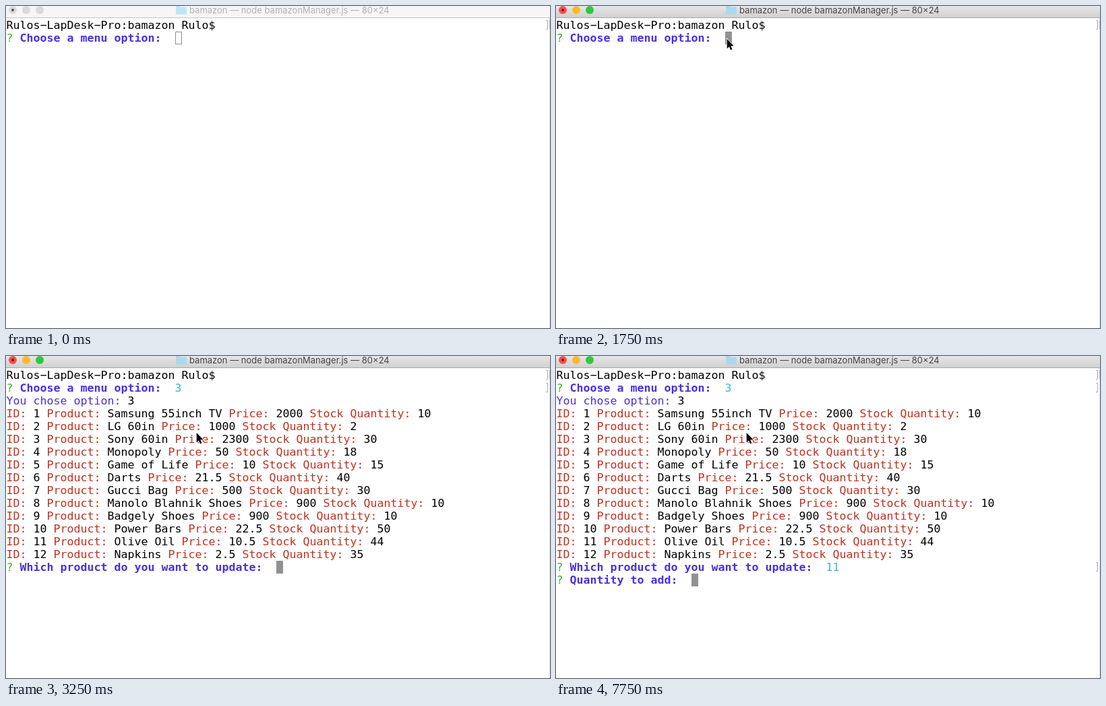
An HTML page for the animation above (8 s loop, 807 by 478 pixels).

```html
<!DOCTYPE html>
<html lang="en">
<head>
<meta charset="utf-8">
<title>Terminal</title>
<style>
html, body { margin: 0; width: 100%; height: 100%; overflow: hidden; background: #fff; }
svg { display: block; }
text { white-space: pre; font: 16.61px "DejaVu Sans Mono", monospace; }
.title { font: 13px Inter, sans-serif; }
.black { fill: #000; }
.red { fill: #c0311f; }
.blue { fill: #4b30db; }
.bold { fill: #4b30db; font-weight: bold; }
.green { fill: #35b02c; }
.cyan { fill: #3bb8c8; }
</style>
</head>
<body>
<svg id="stage" width="807" height="478" viewBox="0 0 807 478"></svg>
<script>
const LOOP = 8000, STEP = 250, CELL = 10, LINE = 19;
const FOCUS = 1750, TYPE_MENU = 2250, LIST = 3250, TYPE_ID = 7250, TYPE_ID2 = 7500, QUANTITY = 7750;

// Pointer tip at each step, starting with the second one
const pointerPath = [
  [128, 152], [148, 111], [162, 100], [206, 99], [236, 54],
  [245, 58], [253, 48], [254, 60], [276, 106], [282, 113]
];

const products = [
  "Samsung 55inch TV|2000|10", "LG 60in|1000|2", "Sony 60in|2300|30",
  "Monopoly|50|18", "Game of Life|10|15", "Darts|21.5|40", "Gucci Bag|500|30",
  "Manolo Blahnik Shoes|900|10", "Badgely Shoes|900|10", "Power Bars|22.5|50",
  "Olive Oil|10.5|44", "Napkins|2.5|35"
].map(p => p.split("|"));

const rect = (x, y, w, h, fill, more = "") =>
  `<rect x="${x}" y="${y}" width="${w}" height="${h}" fill="${fill}" ${more}/>`;

// Prints alternating class, text arguments along one terminal row
function print(row, ...parts) {
  let col = 0, out = "";
  for (let i = 0; i < parts.length; i += 2) {
    const text = parts[i + 1];
    // the terminal face has wide hyphens
    out += `<text class="${parts[i]}" x="${0.6 + col * CELL}" y="${34 + row * LINE}">${text.replace(/-/g, "−")}</text>`;
    col += text.length;
  }
  return out;
}

const prompt = (row, question, kind, answer) =>
  print(row, "green", "? ", "bold", question + "  ", kind, answer);

const block = (row, col, focused) => focused
  ? rect(1 + col * CELL, 19 + row * LINE, CELL, LINE, "#919191")
  : rect(1.5 + col * CELL, 19.5 + row * LINE, CELL - 1, LINE - 1, "#fff", 'stroke="#8c8c8c"');

const bracket = row =>
  `<path d="M801 ${21.5 + row * LINE}h2.5v13h-2.5" fill="none" stroke="#a8a8a8"/>`;

function titleBar(focused) {
  const lights = focused ? ["#fc4f4b", "#fdb82f", "#2fc840"] : ["#dadada", "#dadada", "#dadada"];
  return `<linearGradient id="bar" x2="0" y2="1"><stop stop-color="#e6e6e6"/><stop offset="1" stop-color="#d0d0d0"/></linearGradient>`
    + rect(0, 0, 807, 17, focused ? "url(#bar)" : "#f6f6f6")
    + rect(0, 17, 807, 1, focused ? "#a9a9a9" : "#c4c4c4")
    + lights.map((c, i) => `<circle cx="${10 + 20 * i}" cy="6" r="6" fill="${c}"/>`).join("")
    + `<circle cx="10" cy="6" r="2" fill="${focused ? "#6b0a08" : "#555"}"/>`
    + `<path d="M252 0h6l1.500 1.500h8.500v11h-16z" fill="${focused ? "#acd9ec" : "#bfe6f7"}"/>`
    + `<text class="title" x="272" y="11" fill="${focused ? "#454545" : "#b2b2b2"}">bamazon — node bamazonManager.js — 80×24</text>`;
}

function pointer(t) {
  const i = Math.min(t / STEP, pointerPath.length) - 1;
  if (i < 0) return "";
  const [x, y] = pointerPath[i];
  const arrow = "M0 0V14.200L3.200 11.200L5.300 16.200L7.700 15.200L5.600 10.300H10z";
  return `<g transform="translate(${x + 0.7} ${y + 1})"><path d="${arrow}" transform="translate(.4 1)" fill="#000" opacity=".2"/>`
    + `<path d="${arrow}" stroke="#fff" stroke-width="1.6" paint-order="stroke"/></g>`;
}

function scene(t) {
  const focused = t >= FOCUS;
  let out = rect(0, 0, 807, 478, "#fff") + titleBar(focused)
    + rect(806, 18, 1, 460, "#e2e2e2") + rect(806, 21, 1, 13, "#b0b0b0")
    + bracket(0) + print(0, "black", "Rulos-LapDesk-Pro:bamazon Rulo$");

  const menu = t >= TYPE_MENU ? "3" : "";
  out += prompt(1, "Choose a menu option:", t >= LIST ? "cyan" : "black", menu);
  if (t < LIST) return out + block(1, 25 + menu.length, focused) + pointer(t);

  out += bracket(1) + print(2, "blue", "You chose option: ", "black", "3");
  products.forEach(([name, price, stock], i) => {
    out += print(3 + i, "red", "ID: ", "black", `${i + 1} `, "red", "Product: ", "black", name + " ",
      "red", "Price: ", "black", price + " ", "red", "Stock Quantity: ", "black", stock);
  });

  const id = t >= TYPE_ID2 ? "11" : t >= TYPE_ID ? "1" : "";
  const done = t >= QUANTITY;
  out += prompt(15, "Which product do you want to update:", done ? "cyan" : "black", id);
  out += done
    ? bracket(15) + prompt(16, "Quantity to add:", "black", "") + block(16, 20, true)
    : block(15, 40 + id.length, true);
  return out + pointer(t);
}

const stage = document.getElementById("stage");
const start = performance.now();
let shown = -1;

function frame() {
  const t = Math.floor((performance.now() - start) % LOOP / STEP) * STEP;
  if (t !== shown) stage.innerHTML = scene(shown = t);
  requestAnimationFrame(frame);
}
frame();
</script>
</body>
</html>
```
